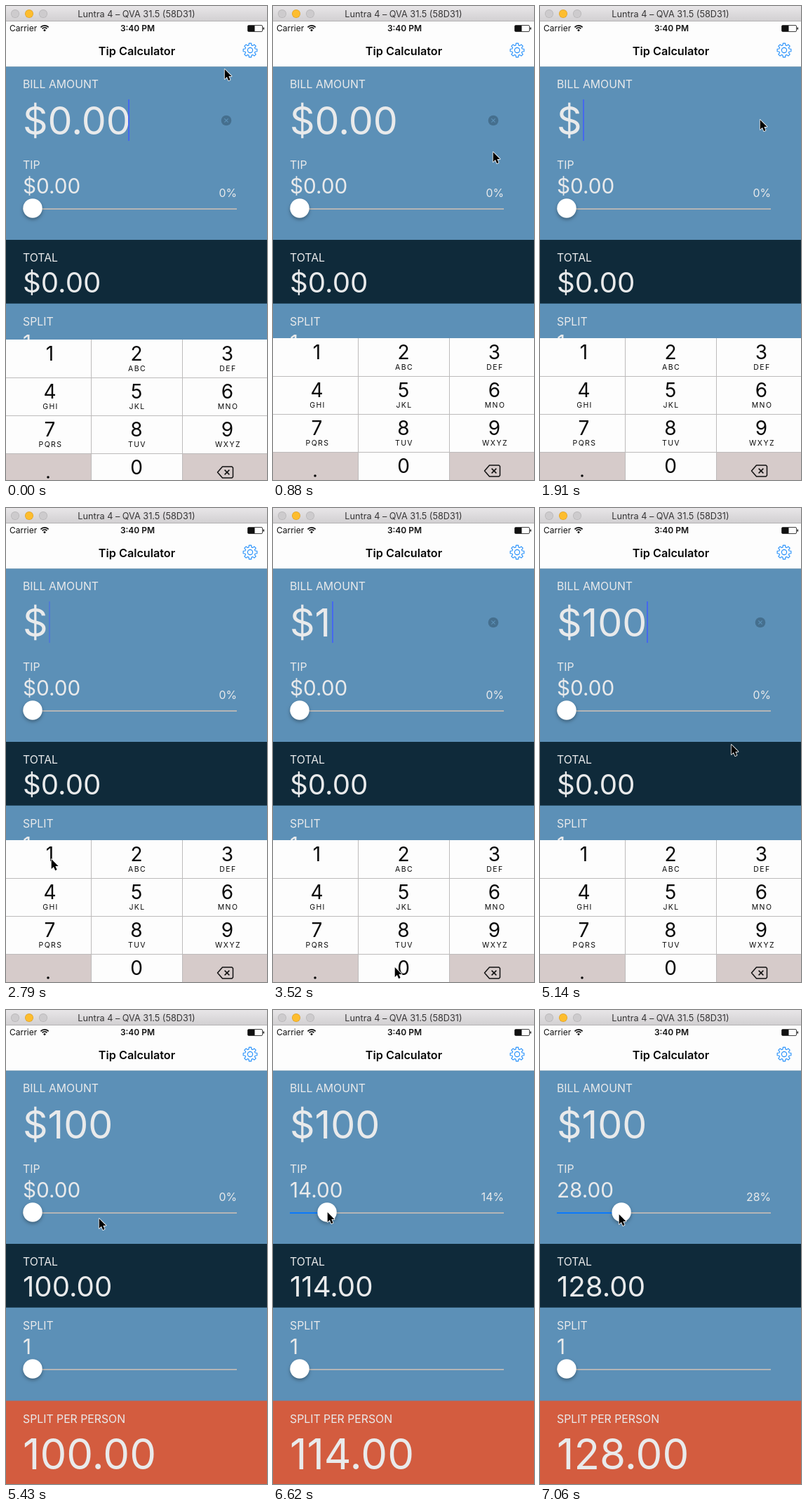
Recreate the animation shown at these times as an HTML page with a canvas. Size 372 by 675 pixels, loop 8 s.

```html
<!DOCTYPE html>
<html lang="en">
<head>
<meta charset="utf-8">
<title>Tip Calculator</title>
<style>
  html, body { margin: 0; width: 100%; height: 100%; overflow: hidden; background: #fdfdfd; }
  canvas { display: block; width: 372px; height: 675px; }
</style>
</head>
<body>
<canvas id="stage"></canvas>
<script>
const W = 372, H = 675, LOOP = 8000, STEP = 147;
const BLUE = '#5c90b7', NAVY = '#0f2a3a', ORANGE = '#d35c3f', PALE = '#e9eaeb';
const FONT = 'Inter, Roboto, sans-serif';
const LABEL = 15.8;

const canvas = document.getElementById('stage');
const ctx = canvas.getContext('2d');
const dpr = window.devicePixelRatio || 1;
canvas.width = W * dpr;
canvas.height = H * dpr;

// All schedules below count in steps of STEP ms.
const pointer = [
  [3, 311, 89], [5, 312, 150], [7, 314, 264], [9, 314, 205], [11, 313, 161],
  [14, 313, 161], [16, 235, 300], [18, 78, 490], [19, 64, 499], [21, 66, 502],
  [22, 135, 598], [24, 173, 653], [28, 173, 653], [30, 269, 346], [32, 272, 336],
  [36, 272, 336], [37, 132, 296], [39, 66, 293], [42, 37, 288], [43, 37, 288],
  [45, 77, 287], [48, 112, 290]
];
const tipDrag = [[43, 0], [45, 14], [48, 28]];
const entries = [[0, '$0.00', 174], [12, '$', 61], [21, '$1', 84], [26, '$10', 118], [27, '$100', 152]];
const DISMISS = 37;

function along(points, k) {
  const i = points.findIndex(p => p[0] >= k);
  if (i === 0) return points[0].slice(1);
  if (i < 0) return points[points.length - 1].slice(1);
  const a = points[i - 1], b = points[i];
  const f = (k - a[0]) / (b[0] - a[0]);
  return a.slice(1).map((v, n) => v + (b[n + 1] - v) * f);
}

const caretAlpha = p => p ? [.5, 1, 1, 1, .5, 0, 0][p % 7] : 1;

function rect(x, y, w, h, color) {
  ctx.fillStyle = color;
  ctx.fillRect(x, y, w, h);
}

function disc(x, y, r, color) {
  ctx.beginPath();
  ctx.arc(x, y, r, 0, Math.PI * 2);
  ctx.fillStyle = color;
  ctx.fill();
}

function text(str, x, y, size, { weight = 400, color = PALE, align = 'left', spacing = 0 } = {}) {
  ctx.font = `${weight} ${size}px ${FONT}`;
  ctx.letterSpacing = spacing + 'px';
  ctx.textAlign = align;
  ctx.fillStyle = color;
  ctx.fillText(str, x, y);
}

function trace(points, close) {
  ctx.beginPath();
  points.forEach(([x, y]) => ctx.lineTo(x, y));
  if (close) ctx.closePath();
}

function cross(x, y, r, color, width) {
  ctx.beginPath();
  ctx.moveTo(x - r, y - r);
  ctx.lineTo(x + r, y + r);
  ctx.moveTo(x + r, y - r);
  ctx.lineTo(x - r, y + r);
  ctx.strokeStyle = color;
  ctx.lineWidth = width;
  ctx.stroke();
}

function titleBar() {
  const g = ctx.createLinearGradient(0, 0, 0, 22);
  g.addColorStop(0, '#e8e6e8');
  g.addColorStop(1, '#d1cfd1');
  rect(0, 0, W, 22, g);
  rect(0, 21, W, 1, '#b4b2b4');
  [['#cdcbcd', '#b5b3b5'], ['#fdbd2e', '#dfa023'], ['#cdcbcd', '#b5b3b5']].forEach(([fill, edge], i) => {
    disc(13 + i * 20, 11, 6, edge);
    disc(13 + i * 20, 11, 5.3, fill);
  });
  text('Luntra 4 – QVA 31.5 (58D31)', 186, 16, 12.7, { color: '#363536', align: 'center' });
}

function gear(x, y) {
  const teeth = 8, points = [];
  for (let i = 0; i < teeth; i++) {
    const mid = i / teeth * Math.PI * 2;
    [[-.27, 7.4], [-.17, 10], [.17, 10], [.27, 7.4]].forEach(([d, r]) =>
      points.push([x + r * Math.cos(mid + d), y + r * Math.sin(mid + d)]));
  }
  ctx.strokeStyle = '#1f8dfb';
  ctx.lineWidth = 1.1;
  trace(points, true);
  ctx.stroke();
  ctx.beginPath();
  ctx.arc(x, y, 3.6, 0, Math.PI * 2);
  ctx.stroke();
}

function navBar() {
  rect(0, 22, W, 64, '#fdfdfd');
  text('Carrier', 5, 36, 12, { color: '#111' });
  text('3:40 PM', 187.5, 36, 12, { weight: 600, color: '#111', align: 'center' });

  ctx.strokeStyle = '#111';
  ctx.lineWidth = 1.7;
  [4.6, 7.6].forEach(r => {
    ctx.beginPath();
    ctx.arc(55, 35.5, r, -Math.PI * .76, -Math.PI * .24);
    ctx.stroke();
  });
  disc(55, 34.6, 1.5, '#111');

  ctx.lineWidth = .8;
  ctx.beginPath();
  ctx.roundRect(344.5, 27.5, 21, 9, 1.5);
  ctx.stroke();
  rect(345, 28, 9.5, 8, '#111');
  rect(366.5, 30.5, 1.5, 3, '#111');

  text('Tip Calculator', 186.5, 70, 16.2, { weight: 600, color: '#080808', align: 'center' });
  gear(348, 63);
}

function slider(x, y) {
  rect(24, y, 305, 2, '#b3b5b6');
  if (x > 38) rect(24, y, x - 24, 2, '#0c79fb');
  ctx.save();
  ctx.shadowColor = 'rgba(0,0,0,.32)';
  ctx.shadowBlur = 5 * dpr;
  ctx.shadowOffsetY = 2.5 * dpr;
  disc(x, y, 13.7, '#fff');
  ctx.restore();
}

function billField(k) {
  const [start, value, caretX] = entries.filter(e => e[0] <= k).pop();
  const editing = k < DISMISS;
  text('BILL AMOUNT', 24, 117, LABEL);
  text(value, 24, 183, 55.5);
  if (!editing) return;
  if (value !== '$') {
    disc(314, 163, 7.3, '#456f8e');
    cross(314, 163, 2.7, BLUE, 1.2);
  }
  ctx.globalAlpha = caretAlpha(k - start);
  rect(caretX, 133, 2, 59, '#4668ee');
  ctx.globalAlpha = 1;
}

function form(k) {
  const tip = Math.round(along(tipDrag, k)[0]);
  const total = (100 + tip).toFixed(2);
  const done = k >= DISMISS;
  rect(0, 86, W, 471, BLUE);
  rect(0, 86, W, .5, '#a9b4bd');
  rect(0, 333, W, 90.7, NAVY);
  rect(0, 556.5, W, 118.5, ORANGE);
  billField(k);

  text('TIP', 24, 231.5, LABEL);
  text(tip ? tip.toFixed(2) : '$0.00', 24, 267, 29.7);
  text(tip + '%', 329, 271.5, LABEL, { align: 'right' });
  slider(38 + tip * 2.79, 288);

  text('TOTAL', 24, 364, LABEL);
  text(done ? total : '$0.00', 24, 408, 40.2);

  text('SPLIT', 24, 454.5, LABEL);
  text('1', 24, 490, 29.7);
  slider(38, 511);

  text('SPLIT PER PERSON', 24, 587.5, LABEL);
  text(total, 24, 654, 60);
}

function backspace(x, y) {
  ctx.strokeStyle = '#111';
  ctx.lineWidth = 1.5;
  ctx.lineJoin = 'round';
  trace([[x - 11, y], [x - 4, y - 8], [x + 9.5, y - 8], [x + 11, y - 6.5],
    [x + 11, y + 6.5], [x + 9.5, y + 8], [x - 4, y + 8]], true);
  ctx.stroke();
  cross(x + 2.5, y, 3.4, '#111', 1.5);
}

function keypad(k) {
  const top = k < 1 ? 475 : k < 2 ? 474 : 473;
  const edges = [0, 121, 251, W], centers = [62.5, 186, 315.5];
  const letters = ['', 'ABC', 'DEF', 'GHI', 'JKL', 'MNO', 'PQRS', 'TUV', 'WXYZ'];
  const pressed = k === 20 ? 0 : k === 25 ? 10 : -1;
  for (let i = 0; i < 12; i++) {
    const col = i % 3, y = top + Math.floor(i / 3) * 54;
    const shaded = i === 9 || i === 11 || i === pressed;
    rect(edges[col], y, edges[col + 1] - edges[col], 55, shaded ? '#d6cbca' : '#fdfdfd');
    const ink = { color: '#0a0a0a', align: 'center' };
    if (i < 9 || i === 10) text(String((i + 1) % 11), centers[col], y + 30, 28, ink);
    if (letters[i]) text(letters[i], centers[col] + 1, y + 45, 10.5, { ...ink, spacing: 1.4 });
  }
  for (let row = 1; row < 4; row++) rect(0, top + row * 54, W, 1, '#bdbbbb');
  [121, 251].forEach(x => rect(x, top, 1, H - top, '#bdbbbb'));
  disc(60, top + 196, 1.8, '#0a0a0a');
  backspace(312.5, top + 189);
}

function arrow(x, y) {
  trace([[0, 0], [0, 14], [3.2, 11], [5.5, 16.2], [7.9, 15.1], [5.7, 10.1], [9.9, 9.9]]
    .map(([dx, dy]) => [x + .7 + dx, y + 1 + dy]), true);
  ctx.lineJoin = 'round';
  ctx.strokeStyle = '#fff';
  ctx.lineWidth = 1.6;
  ctx.stroke();
  ctx.fillStyle = '#000';
  ctx.fill();
}

function draw(ms) {
  const k = Math.min(48, Math.floor((ms % LOOP + 15) / STEP));
  ctx.setTransform(dpr, 0, 0, dpr, 0, 0);
  titleBar();
  navBar();
  form(k);
  if (k < DISMISS) keypad(k);
  arrow(...along(pointer, k));
}

const began = performance.now();
function tick() {
  draw(performance.now() - began);
  requestAnimationFrame(tick);
}
tick();
</script>
</body>
</html>
```
